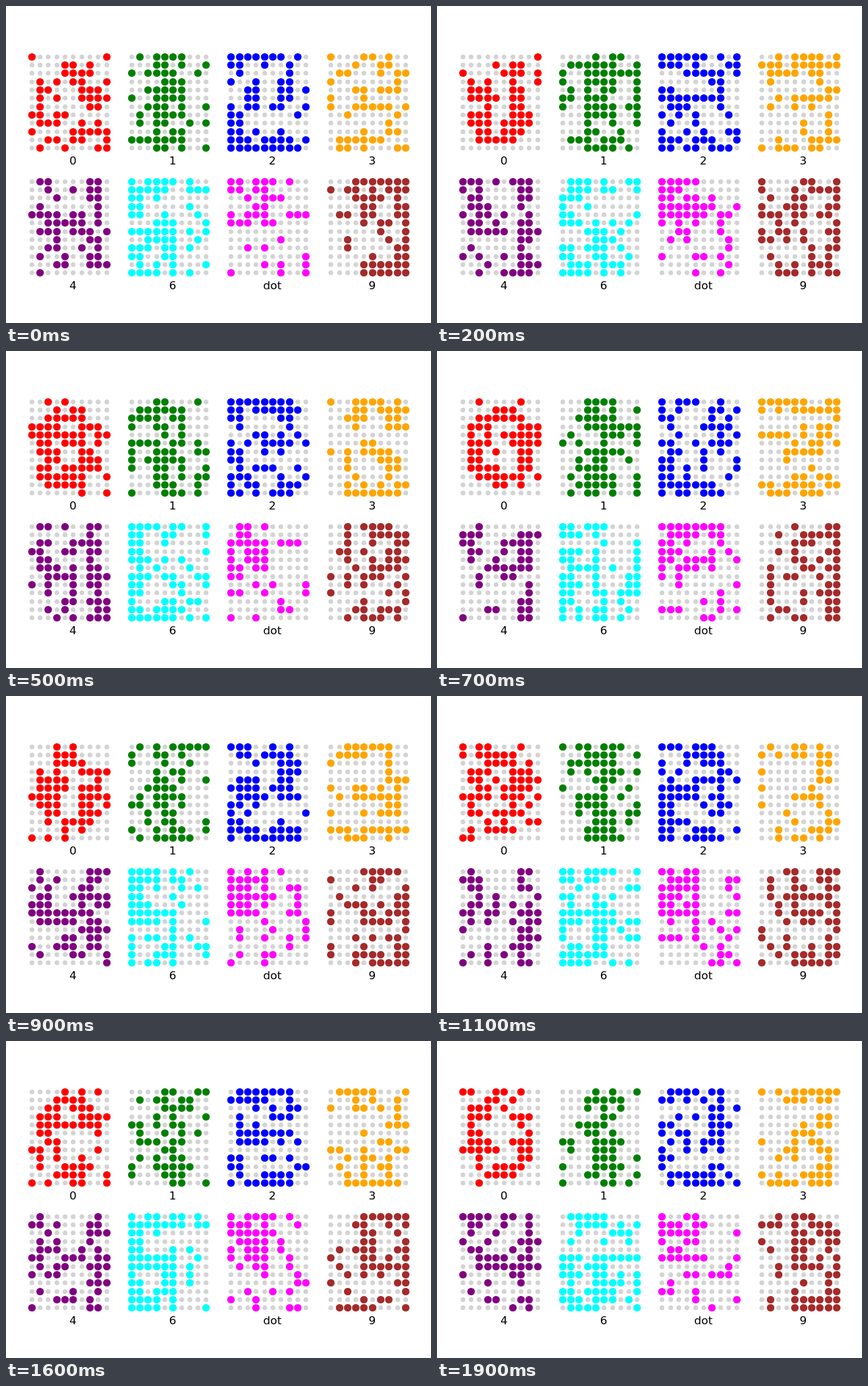
An HTML page that plays this animation: 630x470 px, repeating every 2400 ms.

```html
<!DOCTYPE html>
<html lang="en">
<head>
<meta charset="utf-8">
<title>Noisy digit patterns</title>
<style>
  html, body { margin: 0; width: 100%; height: 100%; overflow: hidden; background: #fff; }
  svg { display: block; }
  text { font: 16.67px "DejaVu Sans", sans-serif; text-anchor: middle; }
</style>
</head>
<body>
<svg id="stage" width="630" height="470" viewBox="0 0 630 470"></svg>
<script>
const COLS = 10, ROWS = 12, PITCH = 12.32;
const STEP = 100, LAST_STEP = 19, LOOP = 2400;
const FLIP_CHANCE = 0.25;

const between = (value, low, high) => value >= low && value <= high;
const fromMiddle = row => Math.abs(row - 5.5);

// Seven-segment shape with strokes two dots thick, between two columns.
function segments(left, right, lit) {
  return (col, row) => {
    if (!between(col, left, right)) return false;
    const upper = row < 6, y = fromMiddle(row);
    const on = segment => lit.includes(segment);
    return y < 1 && on('g')
      || y > 4 && on(upper ? 'a' : 'd')
      || col < left + 2 && on(upper ? 'f' : 'e')
      || col > right - 2 && on(upper ? 'b' : 'c');
  };
}

function roundZero(col, row) {
  const x = Math.abs(col - 4.5), y = fromMiddle(row);
  const hole = x < 1 && y < 3;
  return x < 4 && y < 5 && x + y <= 6 && !hole;
}

function roundThree(col, row) {
  const y = fromMiddle(row);
  return y < 1 ? between(col, 4, 7) : between(col, y > 4 ? 2 : 7, y > 5 ? 7 : 8);
}

const glyphs = [
  { label: '0', color: 'red', covers: roundZero },
  { label: '1', color: 'green', covers: col => between(col, 3, 6) },
  { label: '2', color: 'blue', covers: segments(0, 7, 'abged') },
  { label: '3', color: 'orange', covers: roundThree },
  { label: '4', color: 'purple', covers: segments(1, 8, 'fgbc') },
  { label: '6', color: 'cyan', covers: segments(0, 5, 'afgecd') },
  { label: 'dot', color: 'magenta', covers: (col, row) => col < 5 && row < 6 },
  { label: '9', color: 'brown', covers: segments(4, 9, 'abcdfg') }
];

const stage = document.getElementById('stage');

function add(tag, attributes) {
  const node = document.createElementNS(stage.namespaceURI, tag);
  for (const key in attributes) node.setAttribute(key, attributes[key]);
  return stage.appendChild(node);
}

// Repeatable random number in [0, 1) for a whole-number seed.
function noise(seed) {
  let h = Math.imul(seed + 1, 0x9e3779b1);
  h = Math.imul(h ^ (h >>> 16), 0x85ebca6b);
  h = Math.imul(h ^ (h >>> 13), 0xc2b2ae35);
  return ((h ^ (h >>> 16)) >>> 0) / 2 ** 32;
}

// Dots sit on pixel centres, so that all of them look alike.
const snap = value => Math.floor(value) + 0.5;

const dots = [];
glyphs.forEach(({ label, color, covers }, index) => {
  const left = 38.3 + (index % 4) * 147.8;
  const top = 75.3 + Math.floor(index / 4) * 185;
  for (let row = 0; row < ROWS; row++) {
    for (let col = 0; col < COLS; col++) {
      const node = add('circle', { cx: snap(left + col * PITCH), cy: snap(top + row * PITCH) });
      dots.push({ node, filled: covers(col, row), color });
    }
  }
  add('text', { x: left + 61, y: Math.floor(top) + 160 }).textContent = label;
});

function draw(step) {
  dots.forEach(({ node, filled, color }, i) => {
    const flipped = noise(step * dots.length + i) < FLIP_CHANCE;
    const lit = filled !== flipped;
    node.setAttribute('r', lit ? 5.6 : 3.5);
    node.setAttribute('fill', lit ? color : 'lightgray');
  });
}

let shown = -1;
function tick() {
  const step = Math.min(LAST_STEP, Math.floor(performance.now() % LOOP / STEP));
  if (step !== shown) draw(shown = step);
  requestAnimationFrame(tick);
}
tick();
</script>
</body>
</html>
```
